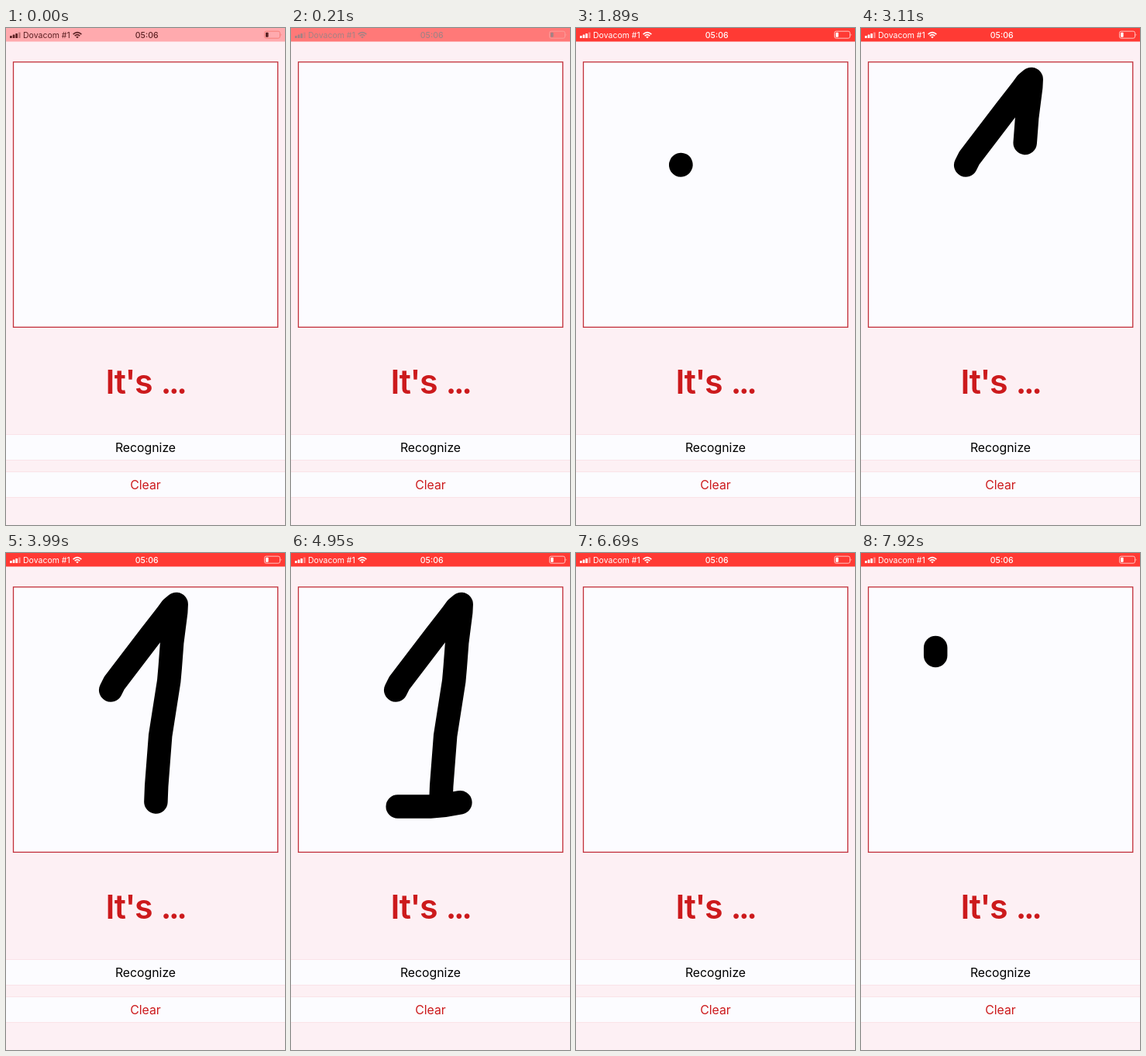
Write an HTML page that moves like this. It is 360 by 640 pixels and loops after 8 s.

```html
<!DOCTYPE html>
<html lang="en">
<head>
<meta charset="utf-8">
<title>Digit recognizer</title>
<style>
  html, body { margin: 0; width: 100%; height: 100%; overflow: hidden; background: #fdf0f4; }
  svg { display: block; width: 100vw; height: 100vh; }
  text { font-family: Inter, Roboto, sans-serif; }

  .anim, .status, .bar, .battery { animation: 8s linear infinite; }

  /* Status bar fades from its dimmed look */
  .bar { fill: #ff3a34; animation-name: bar; }
  .status { color: #fff; fill: currentColor; animation-name: status; }
  .battery { color: #ffd3d0; animation-name: battery; }
  @keyframes bar { 0%, .375% { fill: #ffaaae; } 5.5%, 100% { fill: #ff3a34; } }
  @keyframes status { 0%, .375% { color: #5a2022; } 5.5%, 100% { color: #fff; } }
  @keyframes battery { 0%, .375% { color: #f57a74; } 5.5%, 100% { color: #ffd3d0; } }
  .carrier { font-size: 10.5px; }
  .clock { font-size: 10.5px; font-weight: 500; }

  .handle { animation-name: handle; animation-timing-function: step-end; }
  @keyframes handle { 0% { opacity: 0; } 6.25% { opacity: 1; } 10.875%, 100% { opacity: 0; } }

  /* Ink: drawn length = 400 - dashoffset; 420 hides the stroke */
  .ink {
    fill: none; stroke: #000; stroke-width: 30.5;
    stroke-linecap: round; stroke-linejoin: round;
    stroke-dasharray: 400 900; stroke-dashoffset: 420;
  }
  .stem { animation-name: stem; }
  .base { animation-name: base; }
  .next { animation-name: next; }
  @keyframes stem {
    0%, 23.624% { stroke-dashoffset: 420; }
    23.625% { stroke-dashoffset: 399.5; }
    25% { stroke-dashoffset: 394; }
    33.625% { stroke-dashoffset: 261; }
    34.5% { stroke-dashoffset: 258; }
    38.875% { stroke-dashoffset: 178.5; }
    42.875% { stroke-dashoffset: 72; }
    49.875%, 81.749% { stroke-dashoffset: 0; }
    81.75%, 100% { stroke-dashoffset: 420; }
  }
  @keyframes base {
    0%, 54.624% { stroke-dashoffset: 420; }
    54.625% { stroke-dashoffset: 399.5; }
    63.875% { stroke-dashoffset: 297; }
    65.125% { stroke-dashoffset: 295; }
    68.625%, 81.749% { stroke-dashoffset: 280; }
    81.75%, 100% { stroke-dashoffset: 420; }
  }
  @keyframes next {
    0%, 97.249% { stroke-dashoffset: 420; }
    97.25% { stroke-dashoffset: 399.5; }
    99%, 100% { stroke-dashoffset: 389.5; }
  }

  .answer {
    font-size: 43px; font-weight: 600; fill: #cc1a1c;
    font-variant-numeric: tabular-nums; letter-spacing: -.03em; word-spacing: .05em;
    animation-timing-function: step-end;
  }
  .waiting { animation-name: waiting; }
  .result { opacity: 0; animation-name: result; }
  @keyframes waiting { 0% { opacity: 1; } 74.875% { opacity: 0; } 81.75%, 100% { opacity: 1; } }
  @keyframes result { 0% { opacity: 0; } 74.875% { opacity: 1; } 81.75%, 100% { opacity: 0; } }

  .button { fill: #fcfcff; stroke: #fae3e8; }
  .label { font-size: 15.8px; }
  .middle { text-anchor: middle; }
</style>
</head>
<body>
<svg viewBox="0 0 360 640">
  <rect width="360" height="640" fill="#fdf0f4"/>

  <rect class="bar" width="360" height="17.5"/>
  <g class="status">
    <rect x="5" y="10" width="2.7" height="3" rx=".6"/>
    <rect x="8.7" y="8.5" width="2.7" height="4.5" rx=".6"/>
    <rect x="12.3" y="7" width="2.7" height="6" rx=".6"/>
    <rect x="16" y="5.5" width="2.7" height="7.5" rx=".6" opacity=".4"/>
    <text class="carrier" x="22" y="13">Dovacom #1</text>
    <g fill="none" stroke="currentColor" stroke-width="1.6">
      <path d="M86.6 8.2Q92 3.2 97.4 8.2"/>
      <path d="M88.7 10.2Q92 7.2 95.3 10.2"/>
    </g>
    <path d="M90.2 11.4Q92 9.9 93.8 11.4L92 13.3Z"/>
    <text class="clock middle" x="181.7" y="13">05:06</text>
    <rect x="335" y="5.7" width="3.6" height="6" rx=".8"/>
  </g>
  <g class="battery">
    <rect x="333.5" y="4.2" width="20" height="9" rx="2.2" fill="none" stroke="currentColor" stroke-width=".9"/>
    <path d="M354.7 7.2q1.6 1.5 0 3Z" fill="currentColor"/>
  </g>

  <rect x="9.5" y="43.8" width="341.2" height="341.5" fill="#fcfcff" stroke="#c2303a" stroke-width="1.3"/>
  <g transform="translate(-.3 0)">
    <path class="anim ink stem" d="M135.5 176.5L140 167.5L148 157L187 106L208 79L214 71L220 66L219.5 76L214.5 115L212 148L210.5 165L199.5 235L194.5 300L193.7 320.5"/>
    <path class="anim ink base" d="M138 326.5H180Q206 325 230 318.5Q241 315 252.5 314.3"/>
    <path class="anim ink next" d="M96.5 132V122"/>
  </g>

  <text class="anim answer middle waiting" x="180" y="471">It's ...</text>
  <text class="anim answer middle result" x="179" y="471">It's 1 with 99%</text>

  <rect class="button" x="-2" y="523.5" width="364" height="33"/>
  <text class="label middle" x="180" y="546">Recognize</text>
  <rect class="button" x="-2" y="571.5" width="364" height="33"/>
  <text class="label middle" x="180" y="594" fill="#cc1a1c">Clear</text>

  <rect class="anim handle" x="48" y="639" width="110" height="1" fill="#ddd3d6"/>
</svg>
</body>
</html>
```
